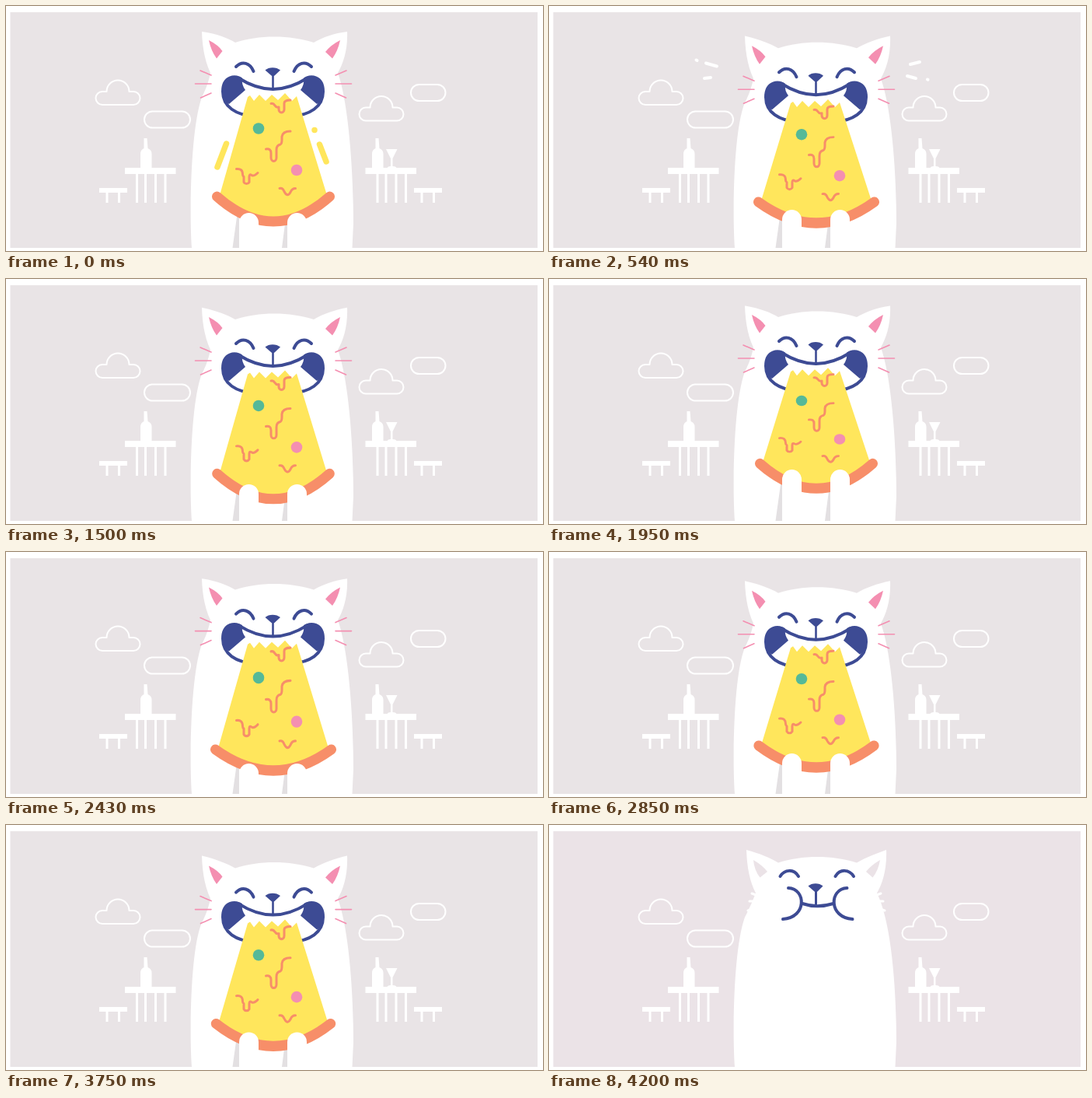
An HTML page for the animation above (4230 ms loop, 691 by 315 pixels).

```html
<!DOCTYPE html>
<html lang="en">
<head>
<meta charset="utf-8">
<title>Hungry cat</title>
<style>
  html, body { margin: 0; width: 100%; height: 100%; overflow: hidden; background: #fff; }
  svg { display: block; width: 100vw; height: 100vh; }
  .line { fill: none; stroke-linecap: round; stroke-linejoin: round; }
  .navy { stroke: #3d4b94; stroke-width: 4; }
  .pink { stroke: #f48fb1; stroke-width: 1.6; }
  .white { stroke: #fff; stroke-width: 4; }
  .yellow { stroke: #ffe65c; stroke-width: 7.5; }
  .sauce { stroke: #f78e69; stroke-width: 3; }
</style>
</head>
<body>
<svg viewBox="0 0 691 315" preserveAspectRatio="none">
  <defs>
    <path id="cloud" class="line" stroke="#fff" stroke-width="2"
      d="M124 127h40a8.5 8.5 0 0 0 0-17h-5.500a14 14 0 0 0-29 0h-5.500a8.500 8.500 0 0 0 0 17z"/>
    <path id="table" fill="#fff" d="M0 208h65.500v8H0zM14 216h3v37h-3zM25 216h3v37h-3zM38 216h3v37h-3zM50.500 216h3v37h-3z"/>
    <path id="bench" fill="#fff" d="M0 234h36v6H0zM8.500 240h3v13h-3zM24 240h3v13h-3z"/>
    <path id="bottle" fill="#fff" d="M4.500 170h4l1 13q5 2 5 7v18H0v-18q0-5 4.500-7z"/>
    <g id="cheek">
      <path fill="#3d4b94" d="M304 95C296 87 278 90 278 110C278 118 282 123 287 126L308 108Q303 101 304 95z"/>
    </g>
    <path id="eye" class="line navy" d="M296 78C304 70 314 73 318.500 84"/>
    <path id="chewEye" class="line navy" d="M297.500 66C303 57 315 56 321 66"/>
    <path id="puff" class="line navy" d="M308 81C331 82 332 119 301 121"/>
    <path id="whiskers" class="line pink" d="M250 83l14 6M243.500 100h20.500M250.500 118l13.500-6"/>
    <path id="stubs" class="line white" style="stroke-width:3" d="M261 88l8 3M258 98h8M256 110l9-3"/>
  </defs>

  <rect id="sky" x="5.500" y="8" width="678.500" height="303"/>
  <use href="#cloud"/>
  <use href="#cloud" x="339" y="20.500"/>
  <g class="line" stroke="#fff" stroke-width="2">
    <rect x="178" y="135.500" width="59" height="21" rx="10.500"/>
    <rect x="521" y="101" width="44.500" height="21" rx="10.500"/>
  </g>
  <use href="#table" x="153"/>
  <use href="#bench" x="120"/>
  <use href="#bottle" x="173"/>
  <use href="#table" x="462.500"/>
  <use href="#bench" x="525"/>
  <use href="#bottle" x="471"/>
  <path fill="#fff" d="M489 184h14.500l-6 12v10q4 0 5 2h-12q1-2 4.500-2v-10z"/>

  <g id="sparksL"><path class="line white" d="M202 73.500l14 4M189.500 69.500l1 .5M200 93l8-1"/></g>
  <g id="sparksR"><path class="line white" d="M465 75l12-3M461 90l11 3M487 94.500l.500.200"/></g>

  <path id="body" fill="#fff"/>
  <path id="gaps" fill="#e3e0e2" d="M291.500 311L300 250V311zM355 311L363 250V311z"/>
  <path id="speed" class="line yellow" d="M283.500 177L272 207M397 159.500v.1M403.500 178L412 200"/>

  <g id="eating">
    <path fill="#f48fb1" d="M261 44Q273 50 278.500 58L271 67.500Q264 58 261 44zM430 44Q418 50 411 59L420 67.500Q427 58 430 44z"/>
    <use href="#whiskers"/>
    <use href="#whiskers" transform="matrix(-1 0 0 1 688 0)"/>
    <use href="#eye"/>
    <use href="#eye" transform="matrix(-1 0 0 1 689 0)"/>
    <path class="line navy" fill="#fff" style="fill:#fff" d="M304 95C296 88 279 90 279 110C279 130 296 140 320 142H367C391 140 408 130 408 110C408 90 391 88 383 95"/>
    <use href="#cheek"/>
    <use href="#cheek" transform="matrix(-1 0 0 1 687 0)"/>
    <path fill="#fff" d="M304 95Q322 107 343.500 107Q365 107 383 95L383 88H304z"/>
    <path class="line navy" d="M299 92.500Q322 107 343.500 107Q365 107 388 92.500"/>
    <path fill="#3d4b94" d="M333.500 82.500C338 78 348 78 353 82.500L345.500 89.500q-2 1.500-4 0z"/>
    <path class="line navy" style="stroke-width:2.600" d="M343.500 88v18"/>
  </g>

  <g id="chewing">
    <path id="innerEars" d="M263 45Q275 52 281 60L271.500 67.500Q264 58 263 45zM426 45Q414 52 408 60L416.500 67.500Q424 58 426 45z"/>
    <use href="#stubs"/>
    <use href="#stubs" transform="matrix(-1 0 0 1 688 0)"/>
    <use href="#chewEye"/>
    <use href="#chewEye" transform="matrix(-1 0 0 1 689.500 0)"/>
    <use href="#puff"/>
    <use href="#puff" transform="matrix(-1 0 0 1 691.500 0)"/>
    <path class="line navy" d="M326 101Q345 107.500 366 101"/>
    <path fill="#3d4b94" d="M333.500 78.500C338 74 348 74 352.500 78.500L345.500 85.500q-2 1.500-4 0z"/>
    <path class="line navy" style="stroke-width:3" d="M343.500 84v18"/>
  </g>

  <g id="pizza">
    <path id="cheese" fill="#ffe65c"/>
    <g id="toppings">
      <circle cx="325" cy="157.500" r="7.300" fill="#55b998"/>
      <circle cx="374" cy="211" r="7.300" fill="#f48fb1"/>
      <path class="line sauce" d="M341 125.500C347 124 345 132 351 130V133a3.500 4 0 0 0 7 0V125q0-4 8-4"/>
      <path class="line sauce" d="M334.500 184q6.500-1 6.500 5v6a3.500 4.500 0 0 0 7 0v-10q0-6 5-7q2-1 2-6v-4q1-7 11-7"/>
      <path class="line sauce" d="M296.500 209.500q8-1 8 7q0 2 1.500 3v7a4 4 0 0 0 7 0v-7q0-4 3-2q3 2 8-3"/>
      <path class="line sauce" d="M352 234.500q4-1 6 4q4 8 8 1q2-5 6.500-5"/>
    </g>
    <path id="crust" class="line" stroke="#f78e69" stroke-width="13"/>
  </g>
  <g id="paws" fill="#fff">
    <rect x="300" width="25" height="130" rx="12.500"/>
    <rect x="362" width="25" height="130" rx="12.500"/>
  </g>
  <path fill="#fff" d="M0 311h691v4H0z"/>
</svg>
<script>
const LOOP = 4230, STEP = 30, BOB = 547, SPARK = 1110;
const GULP = 3810, CHEW = 3930;
const el = Object.fromEntries([...document.querySelectorAll('[id]')].map(n => [n.id, n]));
const set = (id, name, value) => el[id].setAttribute(name, value);
const show = (id, on) => { el[id].style.display = on ? '' : 'none'; };
const clamp = x => Math.min(1, Math.max(0, x));

// Pairs of time and value, joined with cosine easing.
const crustKeys = [[0, 0], [270, -6], [540, 7], [800, -6], [1050, 11], [1330, -8], [1620, 13],
  [1930, -8], [2180, 12], [2430, 9], [2700, 14], [3000, -6], [3270, 15.5], [3540, -6], [3800, 12]];
const sagKeys = [[0, 32], [540, 27], [1050, 33], [1950, 32], [2430, 27], [3270, 29]];
const pawKeys = [[0, 266], [270, 251], [540, 262], [800, 248], [1050, 273], [1330, 250], [1620, 272],
  [1950, 245], [2180, 262], [2430, 272], [2700, 268], [3000, 250], [3270, 270], [3540, 250],
  [3800, 268], [CHEW, 315]];

function track(keys, t) {
  const i = keys.findIndex(k => k[0] > t);
  if (i < 0) return keys[keys.length - 1][1];
  const [t0, a] = keys[i - 1], [t1, b] = keys[i];
  return a + (b - a) * (1 - Math.cos(Math.PI * (t - t0) / (t1 - t0))) / 2;
}

function headDrop(t) {
  if (t >= CHEW) return 2 * Math.sin((4200 - t) / 48);
  if (t < 263) return 1.5 * t / 263;
  const down = (1 + Math.cos(2 * Math.PI * (t - 536) / BOB)) / 2;
  return 1.5 + (5.3 + t * 0.0008) * down;
}

function drawBody(h, chew) {
  const tip = chew ? 32 + h : 33 + h * 0.75;
  const l = chew ? 254 : 252, r = chew ? 434 : 439;
  const y = v => v + h + (chew ? 1.5 : 0);
  set('body', 'd', `M${l} ${tip}C${l + 17} ${y(35)} 285 ${y(41)} 295 ${y(47)}
    C325 ${y(37)} 365 ${y(37)} 396 ${y(47)}C408 ${y(40)} 422 ${y(35)} ${r} ${tip}
    C${r + 1} ${y(56)} ${chew ? 429 : 434} ${y(74)} ${chew ? 422 : 427} ${y(86)}
    C440 ${y(122)} 447 205 447 280L445.500 311H239
    C236 270 237 160 252 ${y(117)}Q260 ${y(102)} ${chew ? 266 : 263} ${y(86)}
    Q${l + 1} ${y(65)} ${l} ${tip}z`);
}

function drawPizza(t, h) {
  const drop = track(crustKeys, t), sag = track(sagKeys, t), top = h * 1.1;
  const edge = 245 + drop, wide = (32 - sag) * 0.4;
  const left = 271.5 - wide, right = 416.5 + wide;
  const curve = (a, b, y) => `${a} ${y}Q344 ${y + 2 * sag} ${b} ${y}`;
  const jag = [[311, 117], [314, 115], [319, 122], [326, 114], [334, 122], [342, 114], [350, 121],
    [359, 112], [368, 122], [374, 116]].map(([x, y]) => `${x} ${y + top}`).join('L');
  set('cheese', 'd', `M${jag}L${right - 3} ${edge}Q344 ${edge + 2 * sag} ${left + 3} ${edge}z`);
  set('crust', 'd', 'M' + curve(left, right, edge));
  const s = 1 + (drop - top) / 130;
  set('toppings', 'transform', `matrix(1 0 0 ${s} 0 ${115 + top - 115 * s})`);
  const k = 1 - clamp((t - GULP) / (CHEW - GULP));
  set('pizza', 'transform', `translate(${343.5 * (1 - k)} ${122 * (1 - k)}) scale(${k})`);
}

function drawSparks(t) {
  const burst = t >= GULP;
  const p = burst ? t - GULP : t % SPARK;
  const on = burst ? p >= 60 && p < 240 : p >= 465 && p < 600;
  show('sparksL', on);
  show('sparksR', on);
  if (!on) return;
  const out = burst ? 103 * clamp(p / 200) : -Math.max(0, 540 - p) * 0.18;
  const lift = burst ? 0 : -out * 0.3;
  set('sparksL', 'transform', `translate(${-out} ${lift})`);
  set('sparksR', 'transform', `translate(${burst ? out * 1.06 : out * 1.5} ${lift})`);
}

function draw(t) {
  const chew = t >= CHEW, h = headDrop(t);
  const sky = chew ? '#ebe3e7' : '#e9e4e6';
  set('sky', 'fill', sky);
  set('innerEars', 'fill', sky);
  drawBody(h, chew);
  drawSparks(t);
  for (const id of ['eating', 'pizza', 'paws', 'gaps']) show(id, !chew);
  show('chewing', chew);
  show('speed', t < 90);
  set('speed', 'transform', `translate(0 ${t * 0.12})`);
  set('eating', 'transform', `translate(0 ${h})`);
  set('chewing', 'transform', `translate(0 ${h})`);
  if (chew) return;
  drawPizza(t, h);
  set('paws', 'transform', `translate(0 ${track(pawKeys, t)})`);
}

const start = performance.now();
function tick() {
  const t = (performance.now() - start) % LOOP;
  draw(Math.floor(t / STEP) * STEP);
  requestAnimationFrame(tick);
}
tick();
</script>
</body>
</html>
```
